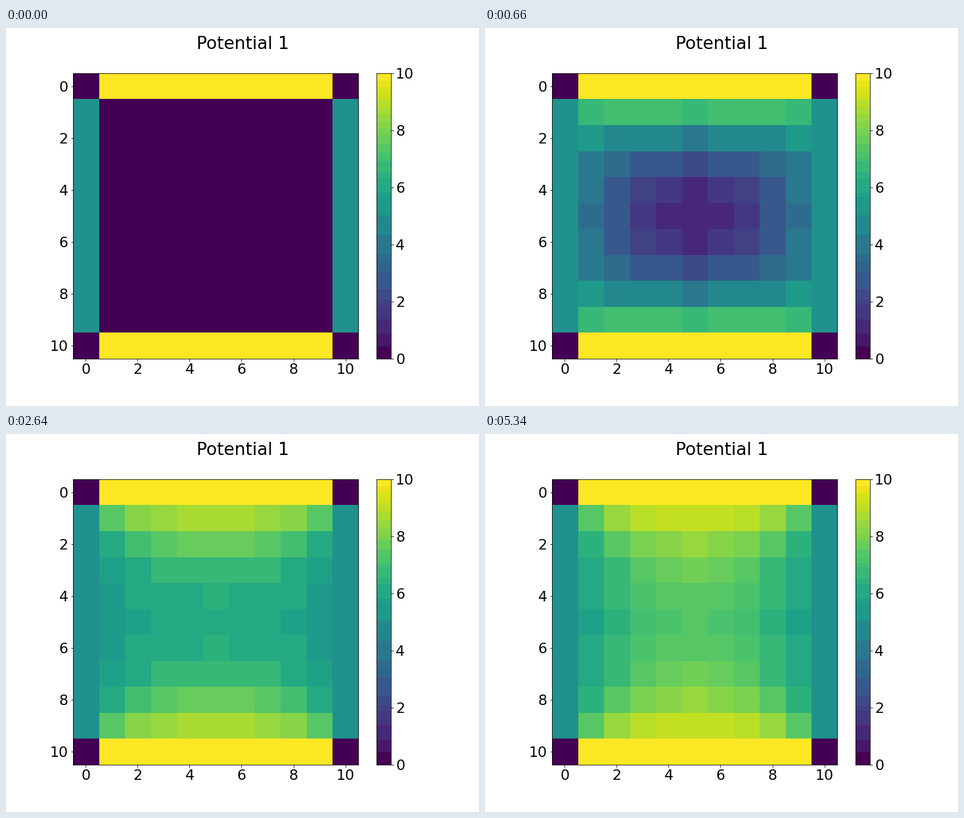
Animation, 720 px wide and 576 px high, one loop 6180 ms. Source, as a matplotlib script:

```python
import numpy as np
import matplotlib.pyplot as plt
from matplotlib.animation import FuncAnimation
from matplotlib.colors import ListedColormap

W, H, DPI = 720, 576, 72
FRAMES, STEP_MS = 103, 60
SIZE = 11
TOP, SIDE = 69.12, 434.88


def banded_viridis(step=16):
    """Viridis in flat bands, cut where red or green passes a multiple of step."""
    lut = plt.get_cmap("viridis")(np.arange(256))[:, :3]
    coarse = lut[:, :2] * 255 // step
    cuts = np.any(np.diff(coarse, axis=0) != 0, axis=1)
    band = np.concatenate([[0], np.cumsum(cuts)])
    colors = np.array([lut[band == b].mean(axis=0) for b in band])
    # The two ends of the scale keep their pure colour.
    for end in (0, -1):
        colors[band == band[end]] = lut[end]
    return ListedColormap(colors)


def relax(steps):
    """Jacobi relaxation of the Laplace equation with fixed walls."""
    u = np.zeros((SIZE, SIZE))
    u[[0, -1], 1:-1] = 10
    u[1:-1, [0, -1]] = 5
    states = [u]
    for _ in range(steps - 1):
        v = u.copy()
        v[1:-1, 1:-1] = (u[:-2, 1:-1] + u[2:, 1:-1]
                         + u[1:-1, :-2] + u[1:-1, 2:]) / 4
        states.append(v)
        u = v
    return states


def add_axes(left, width):
    return fig.add_axes([left / W, 1 - (TOP + SIDE) / H, width / W, SIDE / H])


plt.rcParams.update({"font.family": "DejaVu Sans", "font.size": 22})
fig = plt.figure(figsize=(W / DPI, H / DPI), dpi=DPI, facecolor="white")
fig.suptitle("Potential 1")

states = relax(FRAMES)
style = dict(cmap=banded_viridis(), vmin=0, vmax=10,
             interpolation="nearest", aspect="auto")
ticks = range(0, SIZE, 2)

ax = add_axes(101.52, SIDE)
grid = ax.imshow(states[0], **style)
ax.set_xticks(ticks)
ax.set_yticks(ticks)

bar = add_axes(564.3, SIDE / 20)
bar.imshow(np.linspace(10, 0, 435)[:, None], extent=(0, 1, 0, 10), **style)
bar.set_xticks([])
bar.yaxis.tick_right()
bar.set_yticks(ticks)


def draw(n):
    grid.set_data(states[n])
    return [grid]


anim = FuncAnimation(fig, draw, frames=FRAMES, interval=STEP_MS,
                     repeat=True, repeat_delay=0, blit=False)
plt.show()
```
